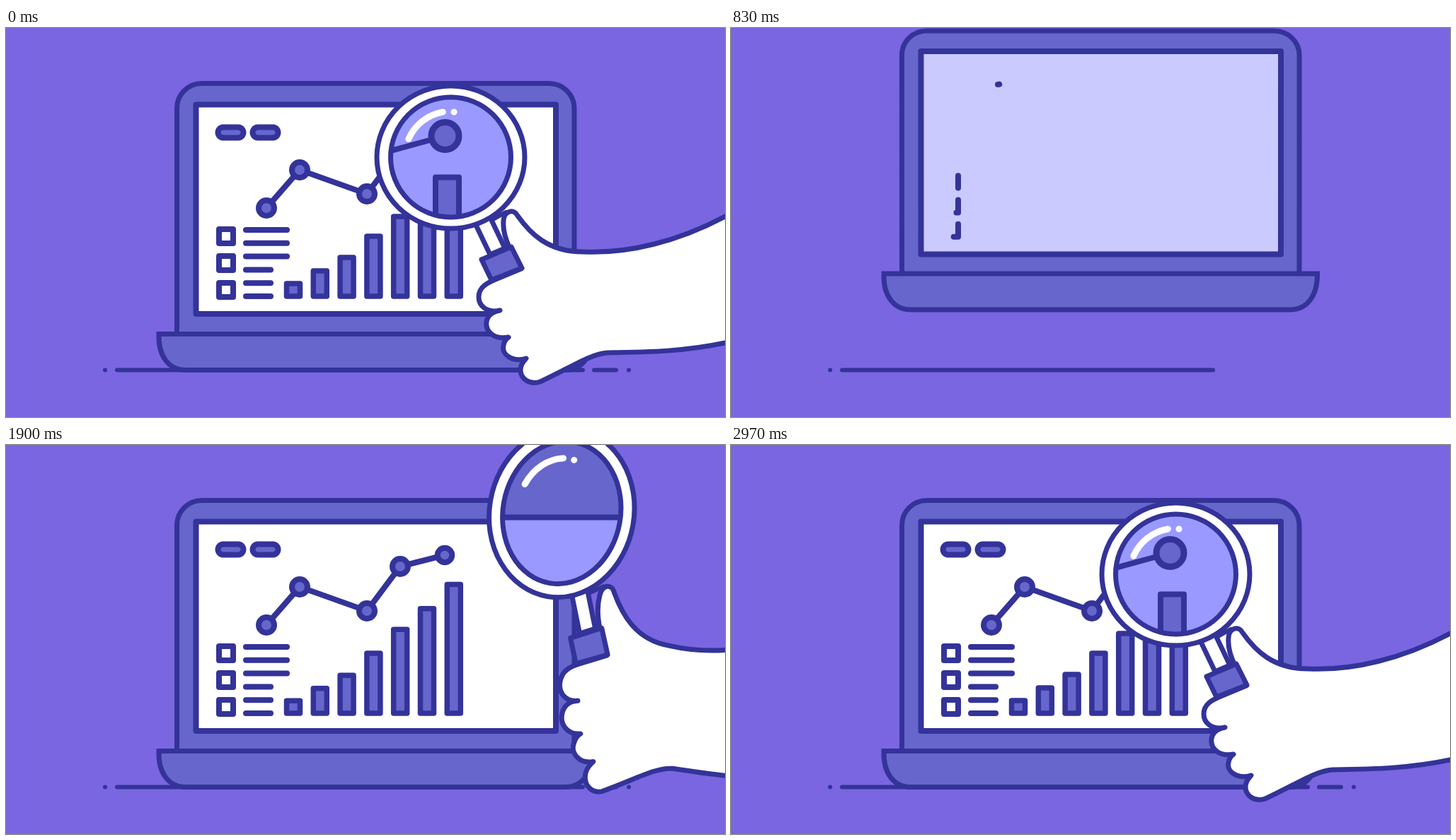
Write an HTML page with a canvas that moves like this. It is 1016 px wide and 551 px high and loops after 4.01 s.

```html
<!DOCTYPE html>
<html lang="en">
<head>
<meta charset="utf-8">
<title>Data analysis</title>
<style>
html, body { margin: 0; width: 100%; height: 100%; overflow: hidden; background: #7a66e0; }
canvas { display: block; }
</style>
</head>
<body>
<canvas id="stage" width="1016" height="551"></canvas>
<script>
const ctx = document.getElementById('stage').getContext('2d');
const LOOP = 4010, POSTER = 100;
const BG = '#7a66e0', DARK = '#333399', MID = '#6666cc', LENS = '#9999ff', WHITE = '#fff';

const clamp = v => Math.max(0, Math.min(1, v));
const ease = (t, start, dur) => 0.5 - 0.5 * Math.cos(Math.PI * clamp((t - start) / dur));

function paint(path, fill, width = 7, stroke = DARK) {
  if (fill) { ctx.fillStyle = fill; ctx.fill(path); }
  if (width) { ctx.strokeStyle = stroke; ctx.lineWidth = width; ctx.stroke(path); }
}

function polyline(pts, map) {
  const path = new Path2D();
  pts.forEach(([x, y]) => path.lineTo(...map(x, y)));
  return path;
}

// First part of a polyline, by share of its length
function trim(pts, share) {
  const lens = pts.slice(1).map((p, i) => Math.hypot(p[0] - pts[i][0], p[1] - pts[i][1]));
  let left = share * lens.reduce((a, b) => a + b, 0);
  const out = [pts[0]];
  for (let i = 0; i < lens.length && left > 0; i++) {
    const k = Math.min(1, left / lens[i]), [ax, ay] = pts[i], [bx, by] = pts[i + 1];
    out.push([ax + (bx - ax) * k, ay + (by - ay) * k]);
    left -= lens[i];
  }
  return out;
}

function drawTrim(pts, share, map, width = 8) {
  if (share > 0.004) paint(polyline(trim(pts, share), map), null, width);
}

function pill(cx, cy, half, r) {
  const pts = [];
  for (let i = 0; i <= 24; i++) {
    const right = i <= 12, a = Math.PI / 2 - Math.PI * (right ? i : i - 1) / 12;
    pts.push([cx + (right ? half : -half) + r * Math.cos(a), cy + r * Math.sin(a)]);
  }
  pts.push([cx - half, cy + r], [cx + half, cy + r]);
  return pts;
}

const trend = [[368, 255], [415, 201], [510, 235], [557, 172], [620, 156]];
const heights = [25, 43, 62, 92, 120, 138, 157];
const pills = [pill(317.5, 148, 10.5, 7.5), pill(366.5, 148, 10.5, 7.5)];

function drawGround(t) {
  const tip = 137 + 746 * ease(t, 52, 1190);
  ctx.strokeStyle = DARK;
  ctx.lineWidth = 6;
  for (const [a, b] of [[140, 140.1], [157, 815], [831, 862], [880, 880.1]]) {
    if (tip <= a) continue;
    ctx.beginPath();
    ctx.moveTo(a, 484.5);
    ctx.lineTo(Math.max(a + 0.1, Math.min(b, tip - 3)), 484.5);
    ctx.stroke();
  }
  if (t < 600) {
    ctx.fillStyle = DARK;
    ctx.fillRect(240, 481.5, 555, 2);
  }
}

function drawLaptop(t) {
  const drop = -560 * clamp((1461 - t) / 1008) ** 4;
  const squash = Math.max(0, (1461 - t) / 631) ** 1.4;
  const lean = 28 * Math.sin(Math.PI * clamp((t - 820) / 620)) ** 2;

  // Leaning widens the top; each layer has its own sideways and upward give
  const project = (amount, lift) => (x, y) => [
    x + amount * lean * (433 - y) / 355 * (x - 522) / 281,
    y + drop + lift(433 - y)
  ];
  const lidMap = project(1, h => 0.031 * squash * h);
  const screenMap = project(0.88, h => 0.031 * squash * h + lean / 12);
  const map = project(0.5, h => Math.min(-drop, 10 * squash ** 0.4) * clamp((h - 50) / 100));

  const lid = new Path2D();
  lid.moveTo(...lidMap(241.5, 433));
  lid.lineTo(...lidMap(241.5, 114));
  lid.bezierCurveTo(...lidMap(241.5, 94), ...lidMap(257, 78.5), ...lidMap(277, 78.5));
  lid.lineTo(...lidMap(767, 78.5));
  lid.bezierCurveTo(...lidMap(787, 78.5), ...lidMap(803, 94), ...lidMap(803, 114));
  lid.lineTo(...lidMap(803, 433));
  paint(lid, MID);

  const lit = clamp((t - 700) / 200);
  const tone = Math.round(102 + 153 * lit), blue = Math.round(204 + 51 * Math.min(1, lit * 1.55));
  const screen = polyline([[268.5, 108.5], [777, 108.5], [777, 405], [268.5, 405]], screenMap);
  screen.closePath();
  paint(screen, `rgb(${tone},${tone},${blue})`, 8);

  const base = new Path2D();
  const y = 433.5 + drop;
  base.moveTo(216, y);
  base.lineTo(828.5, y);
  base.bezierCurveTo(829, y + 30, 815, y + 51, 790, y + 51);
  base.lineTo(254, y + 51);
  base.bezierCurveTo(229, y + 51, 215, y + 30, 216, y);
  base.closePath();
  ctx.lineJoin = 'miter';
  paint(base, MID);
  ctx.lineJoin = 'round';

  drawReport(t, map);
}

function drawReport(t, map) {
  pills.forEach((pts, i) => {
    ctx.globalAlpha = clamp((t - 1130) / 200);
    paint(polyline(pts, map), MID, 0);
    ctx.globalAlpha = 1;
    drawTrim(pts, ease(t, 870 - 90 * i, 500), map);
  });

  for (let i = 0; i < 3; i++) {
    const y = 295 + 38 * i;
    const box = [[321, y - 10], [321, y + 10], [301, y + 10], [301, y - 10], [321, y - 10]];
    drawTrim(box, ease(t, 630 - 20 * i, 620), map);
  }

  for (let i = 0; i < 6; i++) {
    const y = 286 + 18.8 * i, right = i < 3 ? 397 : 374;
    drawTrim([[right, y], [339, y]], ease(t, 925 + 17 * i, 500), map);
  }

  drawBars(t, map);

  drawTrim(trend, ease(t, 927, 813), map);
  trend.forEach(([x, y], i) => {
    const size = ease(t, 1290 + 80 * i, 350);
    if (size < 0.02) return;
    const dot = new Path2D();
    dot.arc(...map(x, y), 11 * size, 0, 7);
    paint(dot, MID, 8);
  });
}

function drawBars(t, map) {
  const half = 9.5 * ease(t, 950, 130);
  if (!half) return;
  heights.forEach((h, i) => {
    const x = 406 + 37.8 * i, s = Math.max(0, t - 930 - 82 * i);
    const grow = 1 - Math.exp(-((s / 360) ** 1.4)) * Math.cos(0.0065 * s);
    const top = 387 - (12 + (h - 12) * grow);
    const bar = polyline([[x - half, 380], [x - half, top], [x + half, top], [x + half, 380]], map);
    bar.closePath();
    paint(bar, MID, 7.5);
  });
}

const hand = new Path2D(`M712 312 C706 300 702 285 703 273 C704 258 718 256 723 266
  C740 290 765 317 815 317 C880 320 950 302 1016 267 C1060 243 1120 200 1200 150
  L1250 390 C1180 412 1080 434 1016 446 C960 458 910 459 850 460
  C825 462 800 480 755 501 C740 506 727 497 727 484 C727 476 732 472 735 468
  C715 474 700 462 703 450 C704 443 707 440 710 438 C690 442 677 430 679 416
  C681 406 688 402 698 400 C680 404 668 394 668 381 C668 367 680 361 692 356 L728 341 Z`);
const neck = new Path2D('M664 279 L684 321 L705 312 L685 270');
const collar = new Path2D('M685 273 L706 261');
const grip = new Path2D('M672 328 L714 310 L729 340 L686 357 Z');
const rim = new Path2D(), glass = new Path2D(), shine = new Path2D();
rim.ellipse(628.5, 183, 104.5, 101, 0, 0, 7);
glass.arc(628.5, 183, 85, 0, 7);
shine.arc(628.5, 183, 65, 3.55, 4.54);
shine.moveTo(633, 119);
shine.lineTo(633.1, 119);

function drawMagnified(u) {
  const y = 29 * u * u;
  ctx.fillStyle = LENS;
  ctx.fillRect(0, 0, 1016, 551);
  ctx.fillStyle = MID;
  ctx.fillRect(0, 0, 1016, 85 + y);
  paint(new Path2D(`M0 ${85 + y} H1016`), null, 8);
  paint(new Path2D(`M540 ${175 + y} L620 ${153 + y}`), null, 8);
  paint(new Path2D(`M607 400 V${211.5 + y} H640 V400`), MID, 8);
  const dot = new Path2D();
  dot.arc(620.5, 153 + y, 19.5, 0, 7);
  paint(dot, MID, 9);
}

function drawHand(t) {
  if (t < 1500) return;
  const u = Math.max(0, (2850 - t) / 1220);
  const m = new DOMMatrix()
    .translate(700 + 355 * u ** 4.2, 333 - 124 * u ** 2 + 71 * u ** 4)
    .rotate(18 * u ** 2.4)
    .scale(1 - 0.1 * u ** 6, 1 + 0.5 * u ** 3.8)
    .translate(-700, -333);
  const pose = shape => {
    const path = new Path2D();
    path.addPath(shape, m);
    return path;
  };

  paint(pose(collar), null, 6);
  paint(pose(neck), WHITE);
  paint(pose(hand), WHITE);
  paint(pose(grip), MID);
  paint(pose(rim), WHITE);
  ctx.save();
  ctx.clip(pose(glass));
  drawMagnified(u);
  ctx.restore();
  paint(pose(glass), null);
  paint(pose(shine), null, 9, WHITE);
}

function render(now) {
  let t = now % LOOP;
  if (t < POSTER) t = LOOP;
  ctx.fillStyle = BG;
  ctx.fillRect(0, 0, 1016, 551);
  ctx.lineCap = ctx.lineJoin = 'round';
  drawGround(t);
  drawLaptop(t);
  drawHand(t);
}

function tick() {
  render(performance.now());
  requestAnimationFrame(tick);
}
tick();
</script>
</body>
</html>
```
